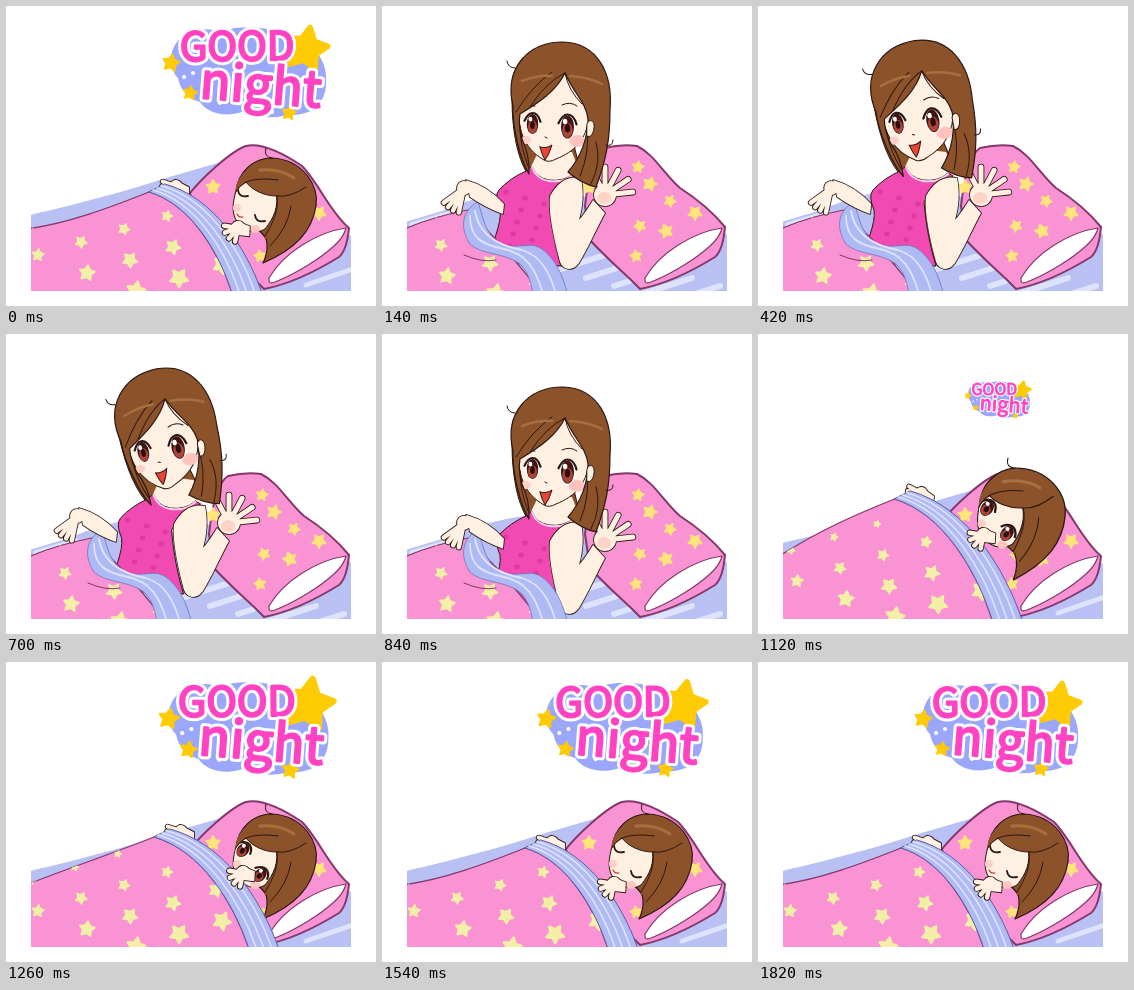
Animation, 370 px wide and 300 px high, one loop 1960 ms. Source, as an HTML page:

```html
<!DOCTYPE html>
<html lang="en">
<head>
<meta charset="utf-8">
<title>Good night</title>
<style>
html, body { margin: 0; width: 100%; height: 100%; overflow: hidden; background: #fff; }
svg { display: block; width: 370px; height: 300px; }
text {
  font-family: 'Noto Sans CJK JP', 'Noto Sans CJK SC', 'Noto Sans', sans-serif;
  stroke-linejoin: round;
}
</style>
</head>
<body>
<svg id="stage" viewBox="0 0 370 300"></svg>
<script>
const INK = '#2b1712', SKIN = '#fff0e2', HAIR = '#8c532b', PINK = '#f993d4',
  SHEET = '#b9c0f4', PALE = '#dee3fc', EDGE = '#83386b', CREAM = '#f3efa6', GOLD = '#ffe47c';
const STEP = 140, STEPS = 14;

const path = (d, fill = 'none', stroke = 'none', w = 1) =>
  `<path d="${d}" fill="${fill}" stroke="${stroke}" stroke-width="${w}" stroke-linecap="round" stroke-linejoin="round"/>`;
const oval = (x, y, rx, ry, fill) => `<ellipse cx="${x}" cy="${y}" rx="${rx}" ry="${ry}" fill="${fill}"/>`;
const group = (transform, ...parts) => `<g transform="${transform}">${parts.join('')}</g>`;
const range = (n, f) => Array.from({ length: n }, (_, i) => f(i));
const mix = (a, b, t) => a.map((v, i) => v + (b[i] - v) * t);

function star(x, y, r, fill, turn = 8) {
  const points = range(10, i => {
    const a = (i * 36 - 90 + turn) * Math.PI / 180, q = i % 2 ? r * .52 : r;
    return (x + q * Math.cos(a)).toFixed(1) + ' ' + (y + q * Math.sin(a)).toFixed(1);
  });
  return path('M' + points.join('L') + 'Z', fill, fill, r * .25);
}

// Pink cover with a slanted lattice of stars growing towards the viewer
function cover(d, x, y) {
  const dots = range(16, n => {
    const i = n % 4, j = (n >> 2) - 1, sx = x + 43 * i + 49 * j, sy = y - 13 * i + 18 * j;
    return star(sx, sy, Math.max(3.5, (sy - 150) / 17 + sx / 80), CREAM, 5 + n * 23 % 30);
  });
  return path(d, PINK, EDGE, 1.2) +
    `<clipPath id="cover">${path(d)}</clipPath><g clip-path="url(#cover)">${dots.join('')}</g>`;
}

// Arm, round palm and a fan of fingers: first as one outline, then filled
function limb(arm, [x, y, r], { from, spread, reach, count, w }) {
  const fingers = range(count, i => {
    const a = (from + spread * i) * Math.PI / 180;
    return `M${x} ${y}l${reach * Math.cos(a)} ${reach * Math.sin(a)}`;
  }).join('');
  return [[INK, 1.7], [SKIN, 0]].map(([c, o]) =>
    path(arm, c, o ? c : 'none', o) + oval(x, y, r + o / 2, r + o / 2, c) + path(fingers, 'none', c, w + o)).join('');
}

const eye = (x, y, rx, ry) =>
  oval(x, y, rx, ry, '#fff') +
  oval(x, y, rx * .82, ry * .92, '#3f1412') +
  oval(x, y + ry * .25, rx * .65, ry * .6, '#ab4637') +
  oval(x, y + 1, rx * .33, ry * .36, '#2a0d0c') +
  oval(x - rx * .3, y - ry * .45, rx * .28, ry * .22, '#fff') +
  path(`M${x - rx - 1} ${y - ry * .3}Q${x - rx * .6} ${y - ry} ${x} ${y - ry}Q${x + rx * .8} ${y - ry} ${x + rx + 1} ${y - ry * .2}`, 'none', INK, 2.2);

const PILLOW_END = 'C342 232 339 246 333 251C312 264 284 278 258 283C246 270 226 254 ';
const UPRIGHT = 'M203 200C206 172 212 148 222 142Q240 138 255 140C272 148 282 168 298 182Q326 200 343 221' + PILLOW_END + '208 234Z';
const FLAT = 'M184 187C196 172 225 145 240 140C256 136 280 149 296 160C312 176 324 206 343 222' + PILLOW_END + '190 210Z';

function pillow(outline) {
  const spots = [[207, 181], [256, 161], [268, 178], [288, 195], [313, 207], [258, 220], [284, 225], [254, 250]];
  return path(outline, PINK, EDGE, 2) +
    spots.map(([x, y], i) => star(x, y, 7 - i % 2, GOLD, i * 9)).join('') +
    path('M340 222C312 226 278 246 263 272Q262 279 269 276C292 267 316 251 328 240Q338 231 340 222Z', '#fff', EDGE, 1.2);
}

// ---------- sitting up ----------

const backHair = () => path('M130 92C130 130 137 156 147 170L200 172L180 90Z', HAIR, INK);

const sitHead = lift =>
  path('M137 96C135 122 141 142 162 154Q167 157 174 153C192 146 204 134 207 112L200 80L182 62Z', SKIN, INK) +
  group(`translate(0 ${lift})`,
    oval(144, 134, 5, 4, '#ffcfc8'), oval(195, 135, 8, 6, '#ffc2bc'),
    eye(150.5, 118, 7, 11), eye(185.5, 121, 8, 12.5),
    path('M143 103Q147 99 153 100M180 99Q188 95 195 100M163 131l2 1', 'none', INK),
    path('M158 141Q164 143 170 139Q167 149 163 154Q160 149 158 141Z', '#ea4436', INK)) +
  path('M131 100C122 62 146 36 181 36C216 37 231 68 228 104C228 134 224 154 214 181Q200 178 186 166C200 150 206 130 206 113C204 96 192 88 183 67C174 86 154 98 138 108Q136 119 140 133Q148 150 147 168C138 154 130 120 131 100Z', HAIR, INK, 1.2) +
  path('M183 67Q164 76 148 101M170 66Q150 80 134 106M183 67Q186 84 200 98M205 122Q208 146 198 170M214 136Q220 156 209 178M138 120Q138 140 146 160M133 62Q126 62 125 55M224 139Q231 141 231 134', 'none', INK) +
  path('M140 75Q156 69 170 70M188 70Q206 71 220 78', 'none', '#a5703f', 2.5) +
  path('M205 118C207 112 213 114 212 122C211 129 208 132 205 130Z', SKIN, INK);

const sitBody = () =>
  path('M146 167L158 142L190 146L200 172L170 198L138 190Z', SKIN) +
  path('M144 165L150 160Q154 172 167 174Q182 176 192 167L197 170Q174 182 168 196C170 220 174 240 180 260L104 256C110 238 120 218 118 204Q112 190 117 184Q128 172 144 165Z', '#f14ab3', INK) +
  range(10, i => oval(124 + i * 19 % 42, 186 + i * 6, 2.8, 2.4, '#e138a2')).join('') +
  path('M150 161Q154 173 167 175Q182 177 192 168', 'none', '#ffd3ee', 2);

// sway: how far she leans aside; drop: how far she has sunk
function sit(sway, drop) {
  return path('M20 217L60 205Q110 184 160 180L345 228V290H20Z', SHEET) +
    path(range(5, i => `M${176 + i * 28} ${264 + i * 8}l50 -16`).join('') + 'M30 219l40 -12', 'none', PALE, 6) +
    pillow(UPRIGHT) +
    group(`translate(0 ${drop - 3 * sway}) rotate(${-10 * sway} 178 180)`, backHair()) +
    group(`translate(${-2 * sway} ${drop})`, sitBody()) +
    group(`translate(0 ${drop})`,
      limb('M168 190C166 208 173 236 177 252C179 265 191 266 197 257C207 240 214 224 223 207L211 194Q204 206 197 214C201 200 202 186 199 172Q180 168 168 190Z',
        [223, 189, 11], { from: -118, spread: 28, reach: 28, count: 5, w: 5 }),
      oval(222, 192, 7, 6, '#ffd3c8')) +
    group(`translate(0 ${drop - 3 * sway}) rotate(${-10 * sway} 178 180)`, sitHead(-3 * sway)) +
    cover('M20 224C45 213 65 208 86 204L125 245L162 290H20Z', 16, 252) +
    path('M90 200C78 210 80 226 88 238C100 250 126 246 140 260Q149 270 151 290H186C180 266 172 252 160 243C148 235 140 243 122 239C104 232 102 214 96 196Z', '#aebaf3', '#6f74b8', .8) +
    path('M88 210C88 230 98 238 118 242C146 247 154 264 161 288M93 205C97 230 118 240 140 244C160 250 168 268 174 288', 'none', PALE, 1.8) +
    path('M82 249Q100 257 114 254', 'none', EDGE) +
    group(`translate(${-9 * sway} ${drop * .4})`,
      limb('M84 174Q106 180 122 198L121 208Q104 202 88 191Z', [82, 182, 7], { from: 102, spread: 14, reach: 25, count: 4, w: 4.5 }));
}

// ---------- lying down ----------

// Edge of the cover falling from its tip to the foot of the picture
function drape(x, y, foot) {
  const dx = foot - x, dy = 287 - y;
  return { c1: [x + dx * .5, y + dy * .12], c2: [x + dx * .84, y + dy * .59], end: [foot, 287] };
}

function lieHead(open) {
  const look = (x, y) => open
    ? group(`translate(${x} ${y}) rotate(40) scale(1 ${open})`, eye(0, 0, 7, 8.5))
    : path(`M${x - 5} ${y - 4}Q${x - 4} ${y + 4} ${x + 5} ${y + 2}`, 'none', INK, 1.8);
  return path('M230 186C232 165 248 152 266 152C298 154 313 180 310 200C306 225 290 243 257 257C262 247 262 239 260 232L245 215Z', HAIR, INK, 1.2) +
    path('M231 182C226 196 225 211 233 217C240 226 251 228 259 223C268 212 273 200 270 186C262 174 244 170 231 182Z', SKIN, INK) +
    oval(231, 202, 4, 4, '#ffd0c8') + oval(249, 223, 5, 4, '#ffc6c0') +
    look(237, 188) + look(254, 213) +
    (open ? '' : path('M231 208Q233 212 237 211', 'none', '#c33', 1.2)) +
    path('M229 187C231 166 248 156 264 156L294 178C292 204 280 222 258 233C268 214 273 202 271 190C258 190 246 184 240 176Q234 180 229 187Z', HAIR) +
    path('M229 187Q233 180 240 176C246 184 258 190 271 190C273 202 268 216 259 230M240 176Q252 171 272 174M271 190Q284 192 300 181M285 200Q282 222 264 240M266 152Q257 151 260 142', 'none', INK) +
    path('M254 164Q274 162 288 172', 'none', '#a8703f', 3);
}

// Tip x, tip y and foot x of the cover: peeking, pulled up, asleep
const COVER = [[125, 155, 226], [148, 175, 243], [143, 186, 226]];

function lie(u, open) {
  const n = Math.min(1, Math.floor(u)), inner = mix(COVER[n], COVER[n + 1], u - n);
  const [x, y] = inner, outer = mix(inner, [x + 16, y - 8, inner[2] + 30], 1);
  const rise = Math.max(0, 1 - u);
  const a = drape(...inner), b = drape(...outer);
  const fold = t => {
    const p = mix(inner, outer, t), { c1, c2, end } = drape(...p);
    return `M${p[0]} ${p[1]}C${c1} ${c2} ${end}`;
  };
  return path('M20 210C80 196 120 185 160 172L215 156L345 230V290H20Z', SHEET) +
    path('M300 279l50 -17', 'none', PALE, 5) +
    pillow(rise > .5 ? UPRIGHT : FLAT) +
    group(`translate(${245 - 13 * rise} ${201 - 27 * rise}) rotate(${-8 * rise}) scale(${1 + .12 * rise}) translate(-245 -201)`, lieHead(open)) +
    group(`translate(${x + 27} ${y - 6}) rotate(${5 + 19 * rise})`,
      limb('M-2 -6L13 0L14 9L0 6Z', [0, 0, 6], { from: 155, spread: 19, reach: 14, count: 3, w: 4 })) +
    cover(`M20 223C60 ${y + 32} ${x - 40} ${y + 16} ${x} ${y}C${a.c1} ${a.c2} ${a.end}H20Z`, 32 + 14 * rise, 249 - 4 * rise) +
    path(`${fold(1)}H${inner[2]}C${a.c2} ${a.c1} ${x} ${y}Z`, '#b0bbf5', '#5d5c9c') +
    [.25, .5, .77].map(t => path(fold(t), 'none', PALE, 1.6)).join('') +
    group(`translate(${x + 88} ${y + 36}) rotate(-8)`,
      limb('M0 -7L13 0L11 10L0 7Z', [1, 0, 7], { from: 110, spread: 29, reach: 14, count: 4, w: 4.5 }));
}

// ---------- title ----------

function word(s, x, y, size, turn) {
  const t = (c, w) => `<text x="${x}" y="${y}" font-size="${size}" fill="${c}" stroke="${c}" stroke-width="${w}" transform="rotate(${turn} ${x} ${y})">${s}</text>`;
  return t('#fff', 8) + t('#ff43c3', 2.2);
}

function title(size, puff) {
  const gold = [[300, 43, 22], [165, 57, 8.5], [184, 87, 7], [283, 107, 7]];
  return group(`translate(240 65) scale(${size}) translate(-240 -65)`,
    path('M178 30C190 20 206 24 216 25C240 18 262 22 284 28C308 36 322 56 320 76C320 100 304 110 282 109C262 114 246 110 236 106C218 112 200 106 194 96C180 92 174 82 172 72C160 60 164 38 178 30Z', '#9aa7fb'),
    ...gold.map(([x, y, r]) => star(x, y, r * puff, '#ffcb05', 11)),
    word('GOOD', 174, 55, 40, -.5), word('night', 193, 92, 50, 4.5),
    ...[[178, 71], [187, 67], [214, 97], [266, 106]].map(([x, y]) => oval(x, y, 2, 2, '#fff')));
}

// ---------- timeline ----------

function scene(n) {
  if (n > 0 && n < 6) return sit(1.3 * (1 - Math.exp(-.7 * (n - 1))), 0);
  if (n === 6) return sit(0, 17);
  const since = n ? n - 7 : 7;
  const open = since < 3 ? 1 : since === 3 ? .5 : 0;
  const bounce = Math.max(0, 1 - (since - 2) / 3);
  return lie(Math.min(2, since / 2), open) +
    (since === 0 ? '' : since === 1 ? title(.4, 1) : title(1 + .03 * bounce, 1 + .14 * bounce));
}

const stage = document.getElementById('stage');
const start = performance.now();
let shown = -1;
function tick(now) {
  const n = Math.floor(Math.max(0, now - start) / STEP) % STEPS;
  if (n !== shown) {
    shown = n;
    stage.innerHTML = '<clipPath id="box"><rect x="25" width="320" height="285"/></clipPath>' +
      `<g clip-path="url(#box)">${scene(n)}</g>`;
  }
  requestAnimationFrame(tick);
}
tick(start);
</script>
</body>
</html>
```
